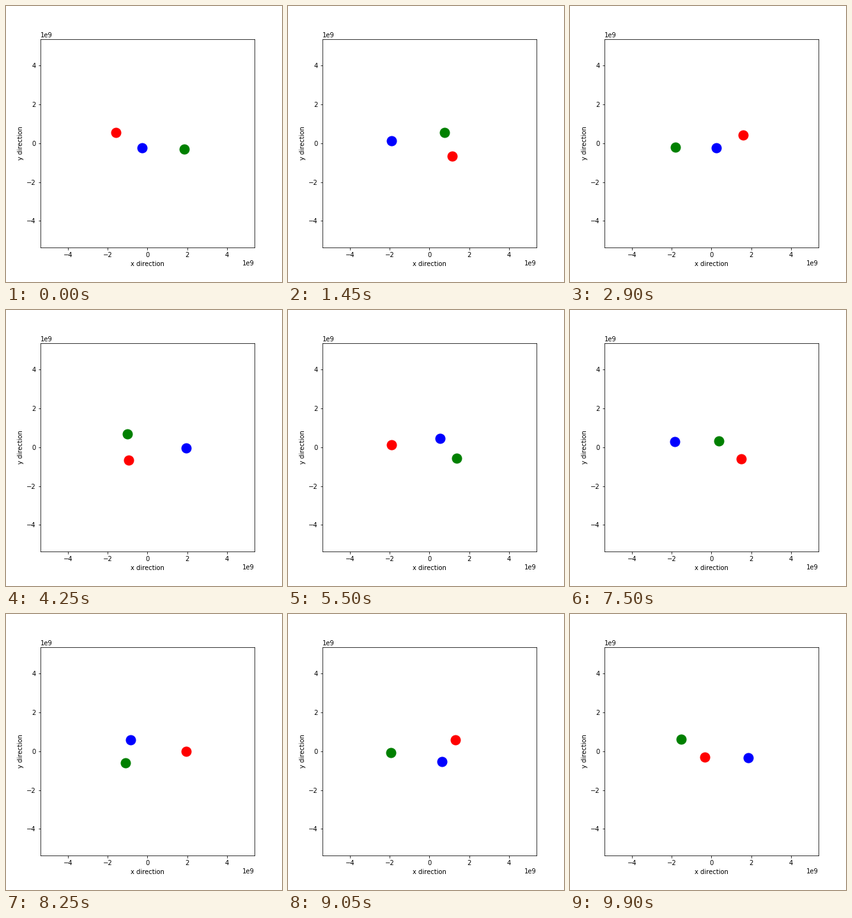
Animation of 432x432 px, one loop 9950 ms. Source, as a matplotlib script:

```python
import numpy as np
import matplotlib.pyplot as plt
from matplotlib.animation import FuncAnimation

FRAMES, INTERVAL = 199, 50
UNIT = 1e9
SIZE = 1.79          # length scale of the orbit, in UNIT
TICK = 0.0534        # orbit time that passes per frame
LIMIT = 3 * SIZE * UNIT
SUBSTEPS = 4
COLORS = ("red", "blue", "green")

# Classic figure-eight start: half velocity of the outer bodies, outer position.
OUTER = SIZE * np.array([-0.970, 0.243])
DRIFT = SIZE * TICK * np.array([0.466, 0.432])

# Key points of the red and blue bodies that fix the slightly perturbed orbit.
KEY_FRAMES = [0, 58, 135, 198]
KEY_POINTS = np.array([
    [(-1.584, 0.549), (-0.268, -0.242)],
    [(1.586, 0.428), (0.240, -0.231)],
    [(0.043, -0.066), (-1.723, -0.396)],
    [(-0.332, -0.297), (1.851, -0.330)],
])


def with_third(pair):
    """Add the third body so that the centre of mass rests at the origin."""
    return np.concatenate([pair, -pair.sum(axis=1, keepdims=True)], axis=1)


def gravity(pos, mu):
    gap = pos[:, None, :, :] - pos[:, :, None, :]
    dist2 = (gap ** 2).sum(axis=-1) + np.eye(3)
    return mu * (gap / (dist2 ** 1.5)[..., None]).sum(axis=2)


def orbits(params, last):
    """Leapfrog a batch of systems; returns positions per frame and system."""
    pos = with_third(params[:, 0:4].reshape(-1, 2, 2))
    vel = with_third(params[:, 4:8].reshape(-1, 2, 2))
    mu = np.exp(params[:, 8])[:, None, None]
    dt = 1 / SUBSTEPS
    acc = gravity(pos, mu)
    path = [pos]
    for _ in range(last):
        for _ in range(SUBSTEPS):
            vel = vel + acc * dt / 2
            pos = pos + vel * dt
            acc = gravity(pos, mu)
            vel = vel + acc * dt / 2
        path.append(pos)
    return np.array(path)


def residuals(params, count):
    keys = KEY_FRAMES[:count]
    found = orbits(params, keys[-1])[keys][:, :, :2]
    miss = found - KEY_POINTS[:count, None]
    return miss.swapaxes(0, 1).reshape(len(params), -1)


def fit(params, count, rounds=15, eps=1e-6):
    """Levenberg-Marquardt fit of the start state to the first key points."""
    damping = 1e-2
    nudges = np.vstack([np.zeros(params.size), eps * np.eye(params.size)])
    batch = residuals(params + nudges, count)
    for _ in range(rounds):
        miss = batch[0]
        jac = (batch[1:] - miss).T / eps
        normal = jac.T @ jac
        damped = normal + damping * np.diag(np.diag(normal))
        trial = params - np.linalg.solve(damped, jac.T @ miss)
        trial_batch = residuals(trial + nudges, count)
        if (trial_batch[0] ** 2).sum() < (miss ** 2).sum():
            params, batch = trial, trial_batch
            damping /= 5
        else:
            damping *= 8
    return params


# Red starts at the outer position, blue at the centre; gravity is kept as a log.
start = np.concatenate([OUTER, 0 * OUTER, DRIFT, -2 * DRIFT,
                        [np.log(SIZE ** 3 * TICK ** 2)]])
for count in (3, 4):
    start = fit(start, count)
path = orbits(start[None], FRAMES - 1)[:, 0] * UNIT

plt.rcParams.update({"font.family": "DejaVu Sans", "font.size": 10})
fig = plt.figure(figsize=(6, 6), dpi=72)
fig.subplots_adjust(left=0.125, right=0.9, bottom=0.125, top=0.88)
ax = fig.add_subplot(xlim=(-LIMIT, LIMIT), ylim=(-LIMIT, LIMIT),
                     xlabel="x direction", ylabel="y direction")
bodies = [ax.plot([], [], "o", color=color, markersize=15)[0] for color in COLORS]


def draw(frame):
    for body, (x, y) in zip(bodies, path[frame]):
        body.set_data([x], [y])
    return bodies


anim = FuncAnimation(fig, draw, frames=FRAMES, interval=INTERVAL, repeat=True)
plt.show()
```
